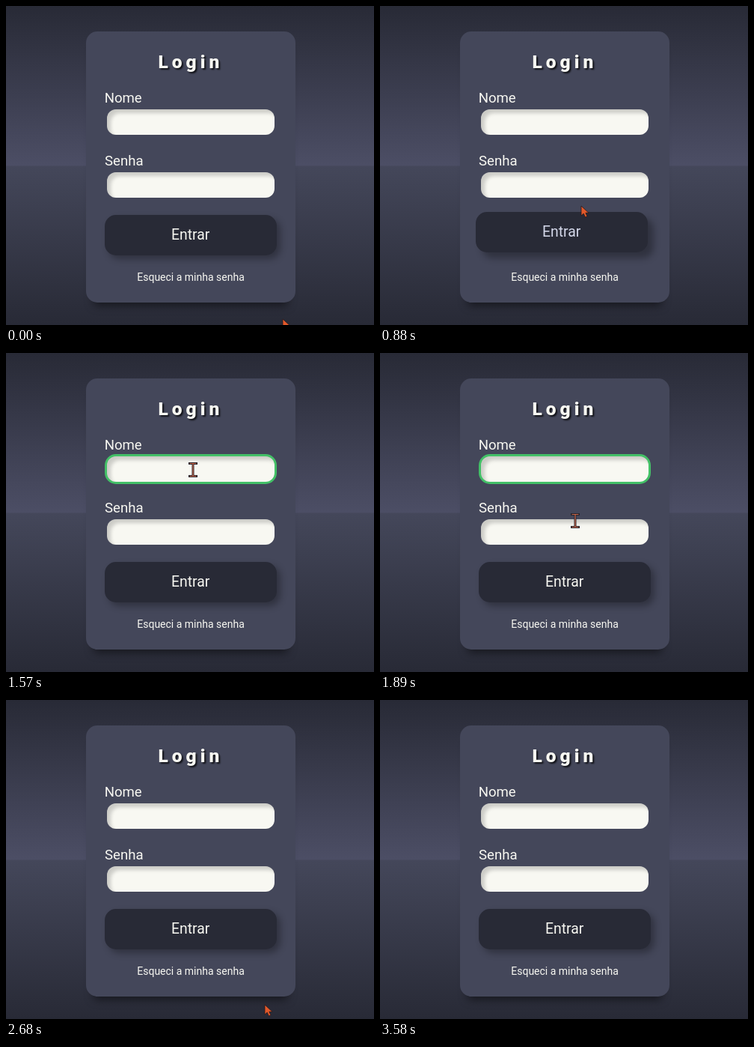
An HTML page for the animation above (3.61 s loop, 492 by 426 pixels).

```html
<!DOCTYPE html>
<html lang="pt">
<head>
<meta charset="utf-8">
<title>Login</title>
<style>
  html, body { margin: 0; width: 100%; height: 100%; overflow: hidden; }
  #stage {
    position: relative; width: 492px; height: 426px; overflow: hidden;
    background: linear-gradient(#282a36 0, #4c4e65 213px, #44475a 214px, #282a36 426px);
  }
  #stage > * { position: absolute; box-sizing: border-box; }
  #card {
    left: 107px; top: 34px; width: 280px; height: 362px; border-radius: 15px;
    background: #44475a; box-shadow: 0 14px 12px -10px rgba(0, 0, 0, .5);
  }
  .field {
    --inset: inset 5px 5px 5px rgba(0, 0, 0, .18);
    left: 135px; width: 224px; height: 34px; border-radius: 12px;
    background: #f8f8f2; box-shadow: var(--inset);
  }
  .field.on { box-shadow: 0 0 0 3px #43c067, var(--inset); }
  #name { top: 138px; }
  #pass { top: 222px; }
  #button {
    left: 132px; top: 279px; width: 230px; height: 54px; border-radius: 15px;
    background: #282a36;
  }
  svg { left: 0; top: 0; }
  text { font-family: Roboto, sans-serif; fill: #f8f8f2; }
  #title { font-size: 24.5px; font-weight: 800; letter-spacing: 5px; text-shadow: 2px 2px 2px rgba(0, 0, 0, .75); }
  .label { font-size: 18.6px; }
  #enter { font-size: 19.4px; }
  #link { font-size: 14px; }
  #arrow, #hand { fill: #e2592a; stroke: #26181c; stroke-width: .8; }
  #beam { fill: none; }
</style>
</head>
<body>
<div id="stage">
  <div id="card"></div>
  <div class="field" id="name"></div>
  <div class="field" id="pass"></div>
  <div id="button"></div>
  <svg width="492" height="426" viewBox="0 0 492 426">
    <text id="title" x="203.5" y="83">Login</text>
    <text class="label" x="131.7" y="129">Nome</text>
    <text class="label" x="132" y="213">Senha</text>
    <text id="enter" x="246.7" y="312" text-anchor="middle">Entrar</text>
    <text id="link" x="247" y="367" text-anchor="middle">Esqueci a minha senha</text>
    <path id="underline" d="M175.5 369.5H319" stroke="#f8f8f2"/>
    <g id="cursor">
      <path id="arrow" d="M0 0V13L3.2 10.2 5.4 15 8 13.9 5.9 9.3H10Z"/>
      <path id="hand" d="M-1 1Q1 -1.5 3 1V7L11 9Q14 10 14 13V16Q14 20 11 21H4L-3 13Q-3 10 -1 11Z"/>
      <g id="beam">
        <path d="M-6 -8.5H6M-6 8.5H6M0 -8.5V8.5" stroke="#25242c" stroke-width="3"/>
        <path d="M-4.5 -8.5H4.5M-4.5 8.5H4.5M0 -8.5V8.5" stroke="#c9664a" stroke-width="1.2"/>
      </g>
    </g>
  </svg>
</div>
<script>
const LOOP = 3610;
const $ = id => document.getElementById(id);

// Pointer path through a few points: time, x, y
const path = [
  [0, 370, 418], [500, 304, 348], [880, 269, 267], [1260, 249, 169],
  [1480, 249, 146], [1890, 261, 224], [2270, 311, 358], [2680, 346, 407],
  [2850, 362, 434]
];

const clamp = v => Math.min(1, Math.max(0, v));
const within = (v, a, b) => v >= a && v < b;
const show = (id, on) => $(id).setAttribute('visibility', on ? 'visible' : 'hidden');

function ease(t, start, length) {
  const u = clamp((t - start) / length);
  return u * u * (3 - 2 * u);
}

// Smooth curve through the path; c picks the coordinate
function follow(t, c) {
  const last = path.length - 1;
  const i = Math.max(0, path.findLastIndex((p, k) => p[0] <= t && k < last));
  const [a, b] = [path[i], path[i + 1]];
  const slope = j => {
    const p = path[Math.max(0, j - 1)], q = path[Math.min(last, j + 1)];
    return (q[c] - p[c]) / (q[0] - p[0]);
  };
  const d = b[0] - a[0], u = clamp((t - a[0]) / d), v = 1 - u;
  return v * v * ((1 + 2 * u) * a[c] + u * d * slope(i))
    + u * u * ((3 - 2 * u) * b[c] - v * d * slope(i + 1));
}

function draw(t) {
  const x = follow(t, 1), y = follow(t, 2);

  const beam = within(y, 138, 172) || within(y, 218, 256);
  const onLink = within(y, 352, 372) && x < 321;
  const hand = onLink || within(y, 275, 333);
  show('beam', beam);
  show('hand', hand);
  show('arrow', !beam && !hand);
  show('underline', onLink);
  $('cursor').setAttribute('transform', `translate(${Math.round(x)} ${Math.round(y)})`);

  // The field highlight trails the pointer
  $('name').classList.toggle('on', within(t, 1300, 1940));
  $('pass').classList.toggle('on', within(t, 1030, 1300) || within(t, 1940, 2080));

  const up = 4 * (ease(t, 490, 240) - ease(t, 880, 230))
    + 3 * (ease(t, 1980, 150) - ease(t, 2170, 160));
  const s = 5 + up * .75;
  $('button').style.transform = `translate(${-up}px, ${-up}px)`;
  $('button').style.boxShadow = `${s}px ${s}px 10px rgba(0, 0, 0, .3)`;
  $('enter').setAttribute('transform', `translate(${-up} ${-up})`);
  $('enter').style.fill = `rgb(${248 - up * 9}, ${248 - up * 8}, ${242 - up * 2})`;
}

function tick(now) {
  draw(now % LOOP);
  requestAnimationFrame(tick);
}
draw(0);
requestAnimationFrame(tick);
</script>
</body>
</html>
```
